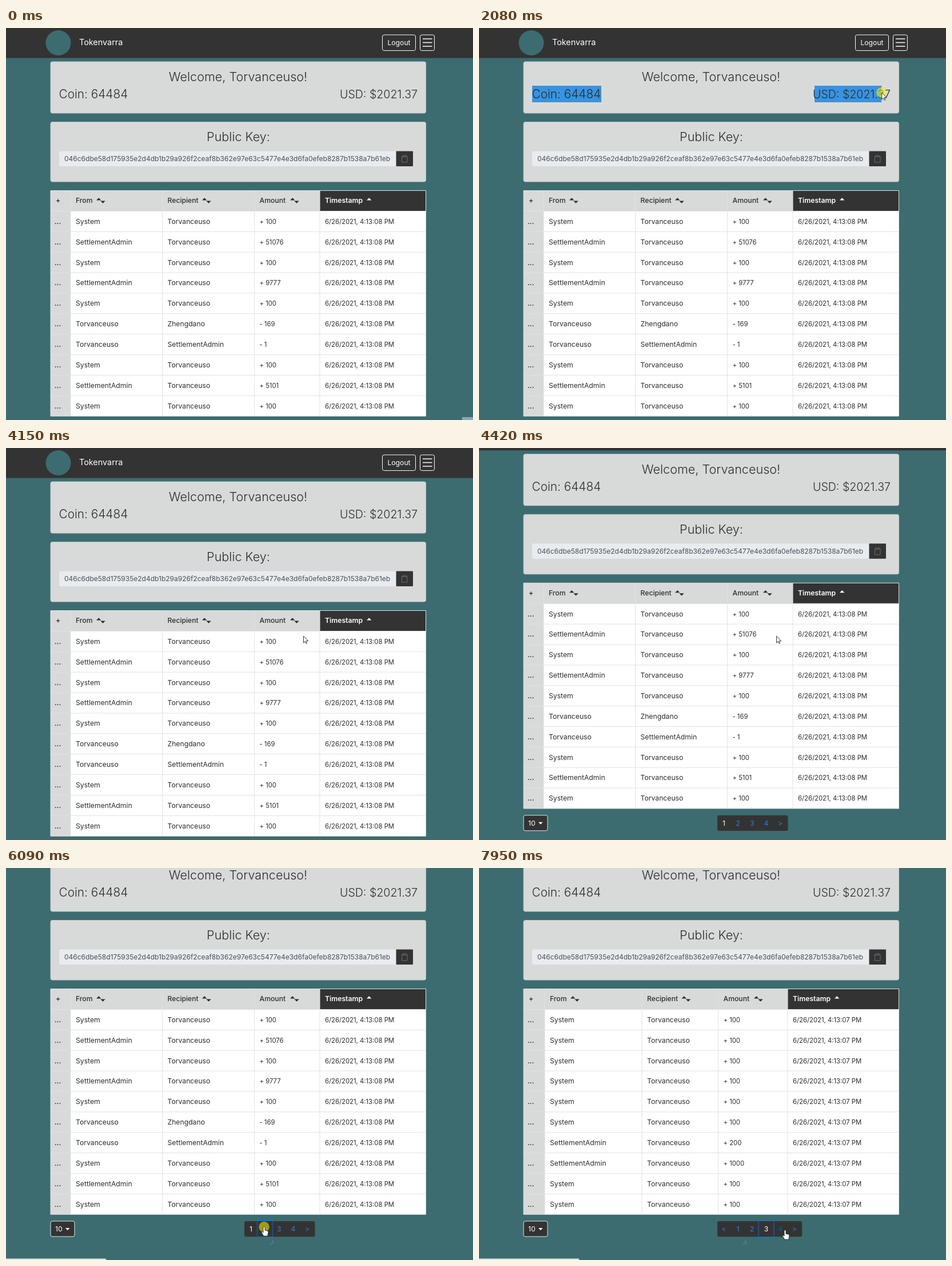
An HTML page that plays this animation: 817x686 px, repeating every 8000 ms.

```html
<!DOCTYPE html>
<html lang="en">
<head>
<meta charset="utf-8">
<title>Wallet dashboard</title>
<style>
  html, body { margin: 0; width: 100%; height: 100%; overflow: hidden; background: #3c6c70; }
  svg { display: block; width: 100%; height: 100%; }
  text { font: 12.2px Inter, "Open Sans", sans-serif; fill: #2b2d2f; white-space: pre; }
  .title { font-size: 21.6px; font-weight: 300; }
  .coin { font-size: 20.8px; font-weight: 300; }
  .usd { font-size: 19.6px; font-weight: 300; }
  .key { font-size: 12px; fill: #495057; }
  .brand { font-size: 14.4px; fill: #fff; }
  .num { font-size: 11.3px; }
  .head { font-weight: 500; }
  .sorted { font-weight: 600; fill: #fff; }
  .bold { font-weight: 600; }
  .light { fill: #fff; }
  .link { fill: #2b7de9; }
  .hover { fill: #0056b3; }
  .mid { text-anchor: middle; }
  .end { text-anchor: end; }
  .card { fill: #d8dad9; stroke: #c3c8c8; }
  .dark { fill: #333; }
  .line { fill: none; stroke: #dee2e6; }
  .outline { fill: none; stroke: #f8f9fa; }
</style>
</head>
<body>
<svg viewBox="0 0 817 686" preserveAspectRatio="none">
  <clipPath id="field"><rect x="93" y="215" width="580.5" height="28"/></clipPath>
  <g id="page">
    <rect class="dark" width="817" height="52.5"/>
    <circle cx="91.5" cy="26" r="22" fill="#3c6c70"/>
    <text class="brand" x="128" y="29.5">Tokenvarra</text>
    <rect class="outline" x="658.5" y="12" width="58" height="27.5" rx="3"/>
    <text class="light mid" x="687.5" y="29.8">Logout</text>
    <rect class="outline" x="724.5" y="12" width="25" height="27.5" rx="3"/>
    <path class="outline" stroke-width="1.5" d="M729 19H745.500M729 25.500H745.500M729 32H745.500"/>

    <rect class="card" x="78" y="59" width="656.5" height="90" rx="3"/>
    <g id="selection" fill="#3a93dd">
      <rect x="93" y="101" width="121" height="29"/>
      <rect id="drag" x="587" y="101" height="29"/>
    </g>
    <text class="title mid" x="406" y="93">Welcome, Torvanceuso!</text>
    <text class="coin" x="92.500" y="123">Coin: 64484</text>
    <text class="usd end" x="720" y="123">USD: $2021.37</text>

    <rect class="card" x="78" y="164.500" width="656.5" height="104.500" rx="3"/>
    <text class="title mid" x="406.5" y="198">Public Key:</text>
    <rect x="93" y="215.500" width="590" height="26.500" rx="3" fill="#e8ecef"/>
    <text class="key" x="102" y="233" clip-path="url(#field)">046c6dbe58d175935e2d4db1b29a926f2ceaf8b362e97e63c5477e4e3d6fa0efeb8287b1538a7b61eb</text>
    <rect class="dark" x="682.5" y="215.500" width="29.5" height="26.500" rx="1"/>
    <path fill="none" stroke="#6b6f72" d="M694.500 224.500h-2v10.500h9.500v-10.500h-2M694.500 223h5.500v2.500h-5.500z"/>

    <g id="table"></g>

    <rect x="78" y="691" width="42" height="27" rx="3" class="dark" stroke="#e4e8e8"/>
    <text class="light" x="86" y="709">10</text>
    <path fill="#fff" d="M104 703h7.500l-3.750 4z"/>
    <g id="pager"></g>
  </g>
  <rect id="corner" x="798" y="681" width="19" height="5" fill="#8fa5b3"/>
  <path id="speck" d="M462 659l4-4 3 2M466 655l1-4" fill="none" stroke="#76797a" stroke-width="1.3"/>
  <path id="status" d="M0 683.500H173.500q2 0 2 2.500H0z" fill="#dfe4e5"/>
  <g id="cursor">
    <circle id="click" r="9.2" fill="#ffee00" opacity=".55"/>
    <path id="arrow" d="M.5 0V12L3.200 9.400 5 13.300 6.600 12.600 4.900 8.700H8.700Z" fill="#fff" stroke="#222" stroke-width=".9"/>
    <path id="hand" d="M-1.500 8V1a1.500 1.500 0 0 1 3 0V6l4.500 1.200q1.500.5 1.500 2L6.500 13V16H-1.500V14.500L-4.500 10q-.5-1.500 1-1.500L-1.500 10Z" fill="#fff" stroke="#222" stroke-width=".8"/>
  </g>
</svg>
<script>
const LOOP = 8000;
const el = id => document.getElementById(id);
const show = (id, on) => el(id).style.display = on ? "" : "none";
const text = (x, y, s, cls = "") => `<text class="${cls}" x="${x}" y="${y}">${s}</text>`;
const rect = (x, y, w, h, extra) => `<rect x="${x}" y="${y}" width="${w}" height="${h}" ${extra}/>`;

const NAMES = { S: "System", A: "SettlementAdmin", U: "Torvanceuso", Z: "Zhengdano" };
const mint = "SU+ 100";
// Each row: sender, recipient, amount
const PAGES = [
  { cols: [113, 273.5, 434.5, 549], time: "08",
    rows: [mint, "AU+ 51076", mint, "AU+ 9777", mint, "UZ- 169", "UA- 1", mint, "AU+ 5101", mint] },
  { cols: [115, 248.5, 418.5, 540], time: "07",
    rows: [mint, "UA- 50", mint, mint, "UA- 10", mint, mint, "UA- 25", mint, mint] },
  { cols: [115, 285, 418.5, 540], time: "07",
    rows: [mint, mint, mint, mint, mint, mint, "AU+ 200", "AU+ 1000", mint, mint] }
];
const LEFT = 78, RIGHT = 734.5, TOP = 284.5, BODY = 320.5, BOTTOM = 679.2, ROW = 35.87;

const up = (x, fill) => `<path fill="${fill}" d="M${x} 301.500h8.400l-4.200-4.300z"/>`;
const down = x => `<path fill="#2b2d2f" d="M${x} 302.500h8.400l-4.200 4.200z"/>`;

function drawTable({ cols, time, rows }) {
  const [a, b, c, d] = cols;
  let out = rect(LEFT, TOP, RIGHT - LEFT, BOTTOM - TOP, 'fill="#d8dad9"')
    + rect(a, BODY, RIGHT - a, BOTTOM - BODY, 'fill="#fff"')
    + rect(d, TOP, RIGHT - d, BODY - TOP, 'class="dark"');
  let grid = `M${LEFT} ${TOP}H${RIGHT}V${BOTTOM}H${LEFT}Z`;
  for (const x of cols) grid += `M${x} ${TOP}V${BOTTOM}`;
  for (let i = 0; i < 10; i++) grid += `M${LEFT} ${BODY + i * ROW}H${RIGHT}`;
  out += `<path class="line" d="${grid}"/>` + text(91, 306, "+", "bold mid");
  [["From", 36], ["Recipient", 60.5], ["Amount", 53.5]].forEach(([label, gap], i) => {
    const x = cols[i] + 9;
    out += text(x, 306, label, "head") + up(x + gap, "#2b2d2f") + down(x + gap + 7.3);
  });
  out += text(d + 9, 306, "Timestamp", "sorted") + up(d + 82, "#fff");
  rows.forEach((r, i) => {
    const y = BODY + i * ROW + 22.3;
    out += text(90.5, y, "...", "bold mid")
      + text(a + 9, y, NAMES[r[0]])
      + text(b + 9, y, NAMES[r[1]])
      + text(c + 9, y, r.slice(2), "num")
      + text(d + 9, y, `6/26/2021, 4:13:${time} PM`, "num");
  });
  el("table").innerHTML = out;
}

function drawPager(page, focus, pointerX) {
  const items = [...(page ? ["&lt;"] : []), 1, 2, 3, 4, "&gt;"];
  let out = rect(417, 691, items.length * 24.7, 27.3, 'class="dark" rx="3"');
  items.forEach((s, i) => {
    const x = 428.4 + 24.7 * i;
    const cls = s === page + 1 ? "light" : Math.abs(pointerX - x) < 12.3 ? "hover" : "link";
    if (s === focus) out += rect(x - 13.5, 690, 27, 29.5, 'fill="none" stroke="#007bff" stroke-opacity=".4" stroke-width="2"');
    out += text(x, 709, s, cls + " mid");
  });
  el("pager").innerHTML = out;
}

// Keys are [time, ...values]
function along(keys, t, ease) {
  const i = keys.findIndex(k => k[0] > t);
  if (i === 0) return keys[0].slice(1);
  if (i < 0) return keys[keys.length - 1].slice(1);
  const p = keys[i - 1], q = keys[i];
  const u = ease((t - p[0]) / (q[0] - p[0]));
  return p.slice(1).map((v, j) => v + (q[j + 1] - v) * u);
}
const linear = u => u;
const smooth = u => u * u * (3 - 2 * u);

const SCROLL = [[4349, 0], [4350, 20], [4420, 48], [4490, 66], [4560, 73]];
const POINTER = [
  [340, 747, 589], [880, 556, 102], [1070, 556, 102], [1210, 582, 113], [1680, 582, 113],
  [2200, 723, 113], [2340, 723, 110], [2610, 723, 110], [2800, 765, 124],
  [3220, 793, 352], [3350, 738, 379], [3690, 738, 379], [4150, 520, 329], [4560, 520, 329],
  [5150, 481, 655], [5220, 481, 655], [5550, 451.5, 628], [6690, 451.5, 628],
  [7000, 500.5, 627], [7550, 500.5, 627], [7900, 535.5, 634]
];

let tableKey, pagerKey;
function render(t) {
  const within = (a, b) => t >= a && t < b;
  const page = t < 6150 ? 0 : t < 7150 ? 1 : 2;
  const focus = t < 6090 ? 0 : t < 7090 ? 2 : 3;
  const [scroll] = along(SCROLL, t, linear);
  const [x, y] = along(POINTER, t, smooth);
  const hand = t > 5000 && y < 646;

  if (tableKey !== page) drawTable(PAGES[tableKey = page]);
  const hoverX = hand ? x : -99;
  const key = [page, focus, hoverX].join();
  if (pagerKey !== key) drawPager(page, focus, hoverX), pagerKey = key;

  el("page").setAttribute("transform", `translate(0 ${-scroll})`);
  el("cursor").setAttribute("transform", `translate(${x} ${y})`);
  el("drag").setAttribute("width", Math.max(0, Math.min(x, 720) - 587));
  show("selection", within(1700, 2400));
  show("cursor", within(340, 2810) || t >= 3220);
  show("click", within(1410, 2610) || within(6090, 6150) || within(7090, 7220));
  show("hand", hand);
  show("arrow", !hand);
  show("corner", t < 70);
  show("speck", t >= 5300);
  show("status", t >= 5750);
}

const start = performance.now();
function tick() {
  render((performance.now() - start) % LOOP);
  requestAnimationFrame(tick);
}
tick();
</script>
</body>
</html>
```
